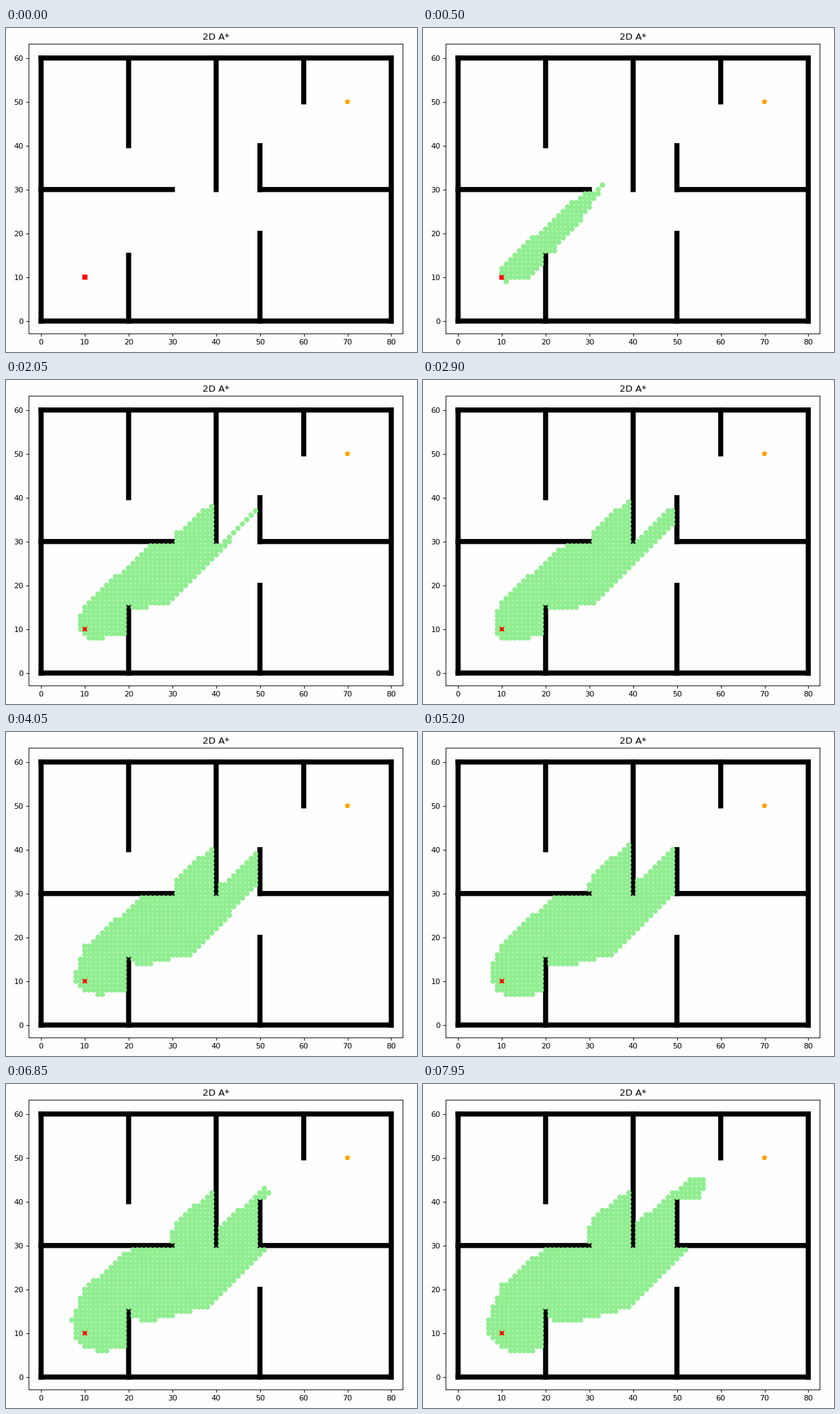
A matplotlib script that plays this animation: 600 by 473 pixels, repeating every 8 s.

```python
import math
from itertools import product

import numpy as np
import matplotlib.pyplot as plt
from matplotlib.animation import FuncAnimation
from matplotlib.patches import Rectangle, RegularPolygon

W, H, DPI = 600, 473, 64
K = 80 / DPI                     # scale of the default point sizes
UNIT_X, UNIT_Y = 6.39, 6.4       # pixels per grid cell
ORIGIN_X, ORIGIN_Y = 51.2, 427.8 # pixel of grid point (0, 0)
LEFT, TOP, RIGHT, BOTTOM = 33.4, 23.4, 579.4, 446.4
DOT, BAR = 7.8, 7.4              # pixel sizes of a dot and of a wall
START, GOAL = (10, 10), (70, 50)
TICK, LOOP = 50, 8000

# Walls as (x0, y0, x1, y1)
WALLS = [(0, 0, 80, 0), (0, 60, 80, 60), (0, 0, 0, 60), (80, 0, 80, 60),
         (20, 0, 20, 15), (20, 40, 20, 60), (0, 30, 30, 30),
         (40, 30, 40, 60), (50, 0, 50, 20), (50, 30, 50, 40),
         (50, 30, 80, 30), (60, 50, 60, 60)]
BLOCKED = {cell for x0, y0, x1, y1 in WALLS
           for cell in product(range(x0, x1 + 1), range(y0, y1 + 1))}
MOVES = [m for m in product((-1, 0, 1), repeat=2) if m != (0, 0)]


def neighbours(node):
    """Free cells around a node; diagonals may not cut wall corners."""
    x, y = node
    for dx, dy in MOVES:
        if BLOCKED.isdisjoint({(x + dx, y + dy), (x + dx, y), (x, y + dy)}):
            yield (x + dx, y + dy), math.hypot(dx, dy)


def search():
    """Cells in the order in which A* first expands them."""
    cost = {START: 0.0}
    frontier = {START: 0.0}
    closed = {}
    while frontier:
        node = min(frontier, key=lambda n: (frontier[n], n))
        del frontier[node]
        if node == GOAL:
            break
        closed[node] = True
        for near, step in neighbours(node):
            new = cost[node] + step
            if new < cost.get(near, math.inf):
                cost[near] = new
                frontier[near] = new + math.hypot(GOAL[0] - near[0],
                                                  GOAL[1] - near[1])
    return np.array(list(closed)[1:])


visited = search()

# Each redraw takes a little longer than the one before.
k = np.arange(37)
redraws = TICK * np.round((150 + 61 * k + 4.27 * k ** 2) / TICK)
# About twenty more cells per redraw.
counts = np.interp(k, [0, 11, 19, 24, 28, 33, 36],
                   [40, 320, 483, 580, 646, 755, 824]).round().astype(int)

plt.rcParams.update({
    "font.family": "DejaVu Sans",
    "font.size": 10 * K,
    "axes.titlesize": 12 * K,
    "axes.titlepad": 6 * K,
    "axes.linewidth": 0.8 * K,
})
for axis in ("xtick", "ytick"):
    plt.rcParams[axis + ".major.size"] = 3.5 * K
    plt.rcParams[axis + ".major.pad"] = 3.5 * K
    plt.rcParams[axis + ".major.width"] = 0.8 * K

fig = plt.figure(figsize=(W / DPI, H / DPI), dpi=DPI, facecolor="#fefefe")
ax = fig.add_axes([LEFT / W, 1 - BOTTOM / H,
                   (RIGHT - LEFT) / W, (BOTTOM - TOP) / H],
                  facecolor="#fefefe")
ax.set_xlim((LEFT - ORIGIN_X) / UNIT_X, (RIGHT - ORIGIN_X) / UNIT_X)
ax.set_ylim((ORIGIN_Y - BOTTOM) / UNIT_Y, (ORIGIN_Y - TOP) / UNIT_Y)
ax.set_xticks(range(0, 81, 10))
ax.set_yticks(range(0, 61, 10))
ax.set_title("2D A*")


def bar(x0, y0, x1, y1, color):
    """A thick line between two cells, with square ends."""
    w, h = BAR / UNIT_X, BAR / UNIT_Y
    ax.add_patch(Rectangle((x0 - w / 2, y0 - h / 2), x1 - x0 + w, y1 - y0 + h,
                           color=color, lw=0, snap=False))


bar(*START, *START, "red")
ax.add_patch(RegularPolygon(GOAL, 5, radius=4 / UNIT_X, color="orange", lw=0))
for wall in WALLS:
    bar(*wall, "black")
cells = ax.scatter(*visited.T, s=np.full(len(visited), (DOT * 72 / DPI) ** 2),
                   color="lightgreen", lw=0, snap=False, zorder=2)


def update(frame):
    done = np.searchsorted(redraws, frame * TICK, side="right")
    cells.set_offsets(visited[:counts[done - 1] if done else 0])
    return cells,


anim = FuncAnimation(fig, update, frames=LOOP // TICK, interval=TICK,
                     repeat=True, repeat_delay=0)
plt.show()
```
